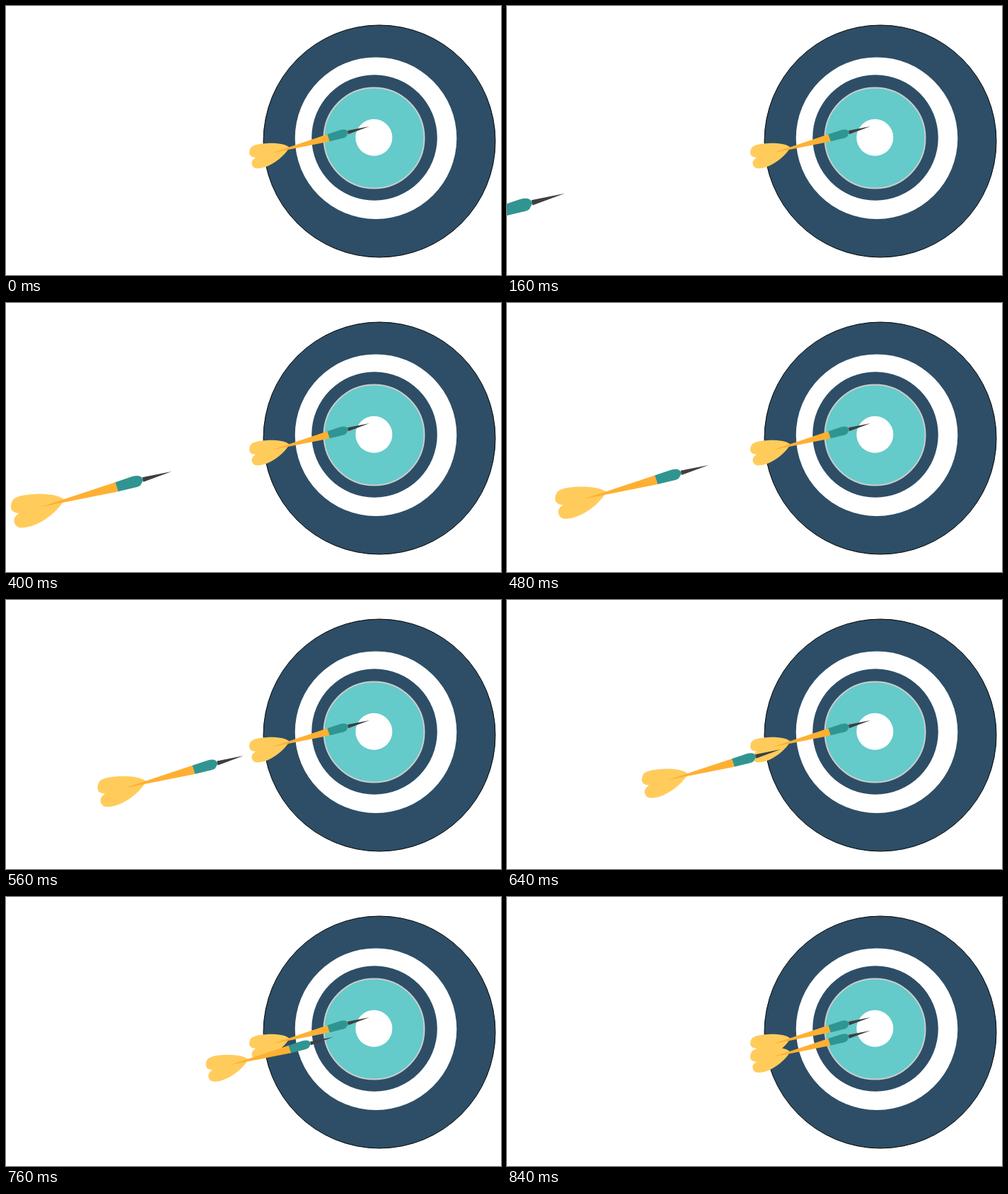
An HTML page with a canvas for the animation above (880 ms loop, 700x380 px).

```html
<!DOCTYPE html>
<html lang="en">
<head>
<meta charset="utf-8">
<title>Dart and board</title>
<style>
  html, body { margin: 0; width: 100%; height: 100%; overflow: hidden; background: #fff; }
  canvas { display: block; }
</style>
</head>
<body>
<canvas id="stage" width="700" height="380"></canvas>
<script>
const ctx = document.getElementById('stage').getContext('2d');
const STEP_MS = 40;
const STEPS = 22;
const NAVY = '#2d4e66';

// Dart parts, measured from the tip at the origin.
const DART = [
  ['#ffcc5c', new Path2D(`M-144.5 38 C-152 31.5 -168 30 -184 30.5
    C-197 31 -211 33 -214.5 39 C-219 48 -217 56 -205.5 56
    C-211 60 -214 64 -211.5 70 C-209 76.5 -202 77 -190 74
    C-171 68 -153 53 -144.5 38Z`)],
  ['#ffb032', new Path2D('M-177 48 L-76 14.5 L-71.5 27Z')],
  ['#309591', new Path2D(`M-76 14.5 L-53 6.8 Q-45 4.5 -41 7.2 L-38 11.5
    L-42 18.5 Q-44 20.5 -51 22 L-71.8 27Z`)],
  ['#3f3f41', new Path2D('M0 0 L-39.5 7.8 L-38 14Z')]
];

function disc(x, y, r, fill, stroke, width) {
  ctx.beginPath();
  ctx.arc(x, y, r, 0, Math.PI * 2);
  ctx.fillStyle = fill;
  ctx.fill();
  if (stroke) {
    ctx.strokeStyle = stroke;
    ctx.lineWidth = width;
    ctx.stroke();
  }
}

function drawBoard() {
  disc(528, 191, 164, NAVY, '#000', 1);
  disc(523, 186.7, 114.3, '#fff');
  disc(521, 186, 88.8, NAVY);
  disc(520.5, 186.5, 71, '#64caca', '#ccc', 2);
  disc(520.3, 185.8, 26, '#fff');
}

function drawDart(x, y, size) {
  const scale = size * 0.784;
  ctx.save();
  ctx.translate(x, y);
  ctx.scale(scale, scale);
  for (const [color, path] of DART) {
    ctx.fillStyle = color;
    ctx.fill(path);
  }
  ctx.restore();
}

function render(now) {
  const step = Math.floor(now / STEP_MS) % STEPS;
  const left = STEPS - 1 - step;
  ctx.fillStyle = '#fff';
  ctx.fillRect(0, 0, 700, 380);
  drawBoard();
  drawDart(514, 170, 1);
  drawDart(513.8 - left * 25.42, 188.7 + left * 4.48, 1 + left * 0.0307);
  requestAnimationFrame(render);
}

requestAnimationFrame(render);
</script>
</body>
</html>
```
